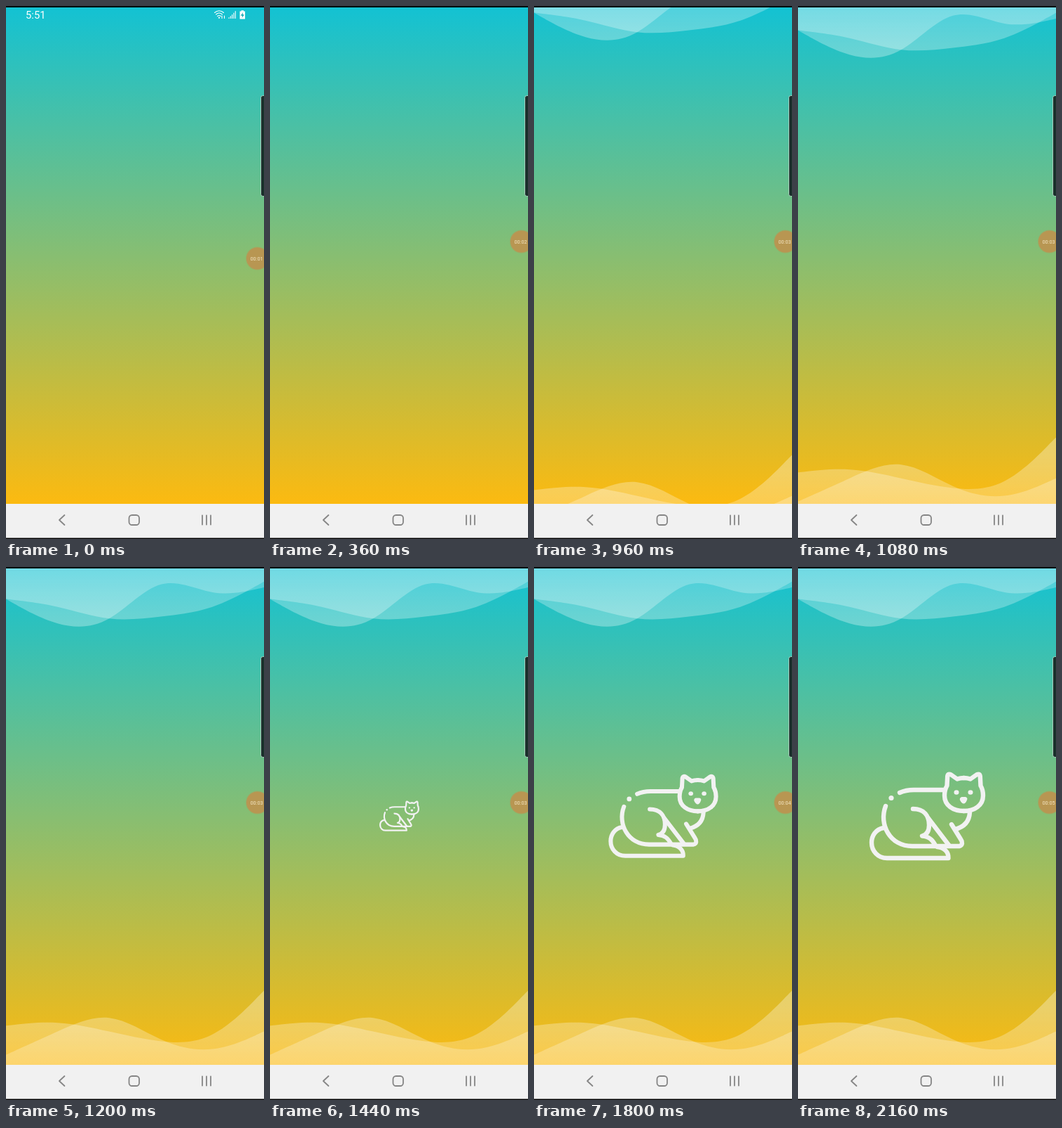
These frames come from a looping animation (368 px wide and 758 px high, 2.28 s). An HTML page:

```html
<!DOCTYPE html>
<html lang="en">
<head>
<meta charset="utf-8">
<title>Cat splash screen</title>
<style>
  html, body { margin: 0; width: 100%; height: 100%; overflow: hidden; background: #000; }
  svg { display: block; width: 100vw; height: 100vh; }
  text { font-family: Roboto, Arial, sans-serif; }
  .line { fill: none; stroke-linecap: round; stroke-linejoin: round; }
</style>
</head>
<body>
<svg viewBox="0 0 368 758">
  <defs>
    <linearGradient id="sky" gradientUnits="userSpaceOnUse" x1="0" y1="2" x2="0" y2="708">
      <stop offset="0" stop-color="#13c2d3"/>
      <stop offset="1" stop-color="#fcba10"/>
    </linearGradient>
    <linearGradient id="foam" gradientUnits="userSpaceOnUse" x1="0" y1="2" x2="0" y2="85">
      <stop offset="0" stop-color="#fff" stop-opacity=".22"/>
      <stop offset="1" stop-color="#fff" stop-opacity=".31"/>
    </linearGradient>
    <linearGradient id="sand" gradientUnits="userSpaceOnUse" x1="0" y1="708" x2="0" y2="625">
      <stop offset="0" stop-color="#fff" stop-opacity=".22"/>
      <stop offset="1" stop-color="#fff" stop-opacity=".31"/>
    </linearGradient>
    <clipPath id="screen"><rect y="2" width="368" height="706"/></clipPath>
  </defs>

  <rect width="368" height="758" fill="#000"/>
  <rect y="2" width="368" height="706" fill="url(#sky)"/>

  <g clip-path="url(#screen)">
    <g id="top" fill="url(#foam)"></g>
    <g id="bottom" fill="url(#sand)"></g>
  </g>

  <g id="cat" class="line" stroke="#f2f2f2" stroke-width="6.4">
    <!-- head: one half, mirrored -->
    <path id="half" d="M236.500 300Q231.500 300 227 301.500L218.500 295.500Q214 293 213.200 297.500L212.500 311Q209 317 209 325C209 339 221 347 236.500 347"/>
    <use href="#half" transform="translate(473 0) scale(-1 1)"/>
    <!-- back, belly and front paw -->
    <path d="M145 321Q154 317 165 317H208"/>
    <path d="M125 340C115 366 131 397 163 397H230C235 396 235 391 232 387L219 366"/>
    <path d="M245 349Q244 368 224 373"/>
    <!-- haunch and legs -->
    <path d="M164 344C180 344 187 354 187 367C187 376 183 381 177 382.500C187 383 192 388 196 396"/>
    <path d="M186 357.500L215.500 396"/>
    <!-- tail -->
    <path d="M122 371C111 373 105 382 105 392C105 404 114 414 127 414H214.500C215 405 208 399 199 398"/>
    <g fill="#f2f2f2" stroke="none">
      <circle cx="133" cy="328.500" r="3.600"/>
      <ellipse cx="226" cy="320.500" rx="3.500" ry="3.200"/>
      <ellipse cx="246" cy="320.500" rx="3.500" ry="3.200"/>
      <path d="M233.500 327H239Q242.500 328 241 331.500Q239 336.500 236.300 336.500T231 331.500Q230 328 233.500 327"/>
    </g>
  </g>

  <g id="status" fill="#fff">
    <text x="28" y="18" font-size="14.800">5:51</text>
    <g class="line" stroke="#fff" stroke-width="1.100">
      <path d="M297.500 9.500Q304 4 310.500 9.500M299.500 12Q304 8 308.500 12M301.500 14.500Q304 12.500 306.500 14.500M308 14V17.500M311.500 17.500V14"/>
      <path d="M318 16.500V17.500M320.300 14.500V17.500M322.600 12.500V17.500M324.900 10V17.500M327.200 7.500V17.500"/>
    </g>
    <circle cx="304" cy="16.700" r="1.100"/>
    <path d="M335.500 6.300H339V7.500H341V18.500H333.500V7.500H335.500Z"/>
    <path d="M338 9L334.700 13.700H337L336.500 17L339.800 12.300H337.500Z" fill="#16a9b2"/>
  </g>

  <rect x="363.500" y="127.500" width="8" height="143" rx="3" fill="#1b302c" stroke="#c4e4d4" stroke-opacity=".8"/>

  <g id="bubble">
    <circle cx="358.500" cy="335" r="16.500" fill="#b89652" opacity=".45"/>
    <circle cx="358.500" cy="335" r="15.500" fill="#b89652"/>
    <text id="clock" x="348.500" y="337.500" font-size="7.300" fill="#f3e6c4"></text>
  </g>

  <rect y="708" width="368" height="48.500" fill="#f1f1f1"/>
  <g class="line" stroke="#858585" stroke-width="1.800">
    <path d="M83.500 724L76 731L83.500 738"/>
    <rect x="175.500" y="724" width="14.500" height="14" rx="4.300"/>
    <path d="M280 724.500V737.500M286 724.500V737.500M292 724.500V737.500"/>
  </g>
</svg>

<script>
const LOOP = 2280, STEP = 120, SECOND = 600;
const WIDTH = 368, WAVE_UNIT = 8.3, WAVE_DROP = 125;
const byId = id => document.getElementById(id);

// Uniform B-spline over evenly spaced heights, filled to the given edge.
function addWave(parent, base, edge, heights) {
  const knots = heights.map((h, i) =>
    [i * WIDTH / (heights.length - 1), base + h * WAVE_UNIT]);
  const first = knots[0], last = knots.at(-1);
  const p = [first, first, ...knots, last, last];
  const mix = (a, b, t) => a.map((v, k) => v + (b[k] - v) * t);

  let d = `M${first}`;
  for (let i = 1; i < p.length - 2; i++) {
    const c1 = mix(p[i], p[i + 1], 1 / 3);
    const c2 = mix(p[i], p[i + 1], 2 / 3);
    const end = mix(c2, mix(p[i + 1], p[i + 2], 1 / 3), 1 / 2);
    d += `C${c1} ${c2} ${end}`;
  }
  const path = document.createElementNS('http://www.w3.org/2000/svg', 'path');
  path.setAttribute('d', `${d}V${edge}H0Z`);
  byId(parent).append(path);
}

addWave('top', 4.1, -140, [5, 10, 10, 0, 5, 3]);
addWave('top', 4.1, -140, [5, 6, 9, 8, 7, 2]);
addWave('bottom', 602.5, 850, [6, 5, 7, 9, 9, 0]);
addWave('bottom', 602.5, 850, [11, 7, 3, 9, 11, 7]);

// Share of a one-second move that is done at time t.
const progress = (t, start) => Math.min(1, Math.max(0, (t - start) / SECOND));

function draw(t) {
  const offset = WAVE_DROP * (1 - progress(t, 533));
  byId('top').setAttribute('transform', `translate(0 ${-offset})`);
  byId('bottom').setAttribute('transform', `translate(0 ${offset})`);

  byId('cat').setAttribute('transform',
    `translate(184.5 354) scale(${progress(t, 1233)}) translate(-184.5 -354)`);

  const windowed = t < 240;
  byId('status').style.display = windowed ? '' : 'none';
  byId('bubble').setAttribute('transform', `translate(0 ${windowed ? 24 : 0})`);
  byId('clock').textContent = `00:0${1 + Math.floor((t + 240) / SECOND)}`;
}

const began = performance.now();
function tick() {
  const t = (performance.now() - began) % LOOP;
  draw(Math.floor(t / STEP) * STEP);
  requestAnimationFrame(tick);
}
tick();
</script>
</body>
</html>
```
